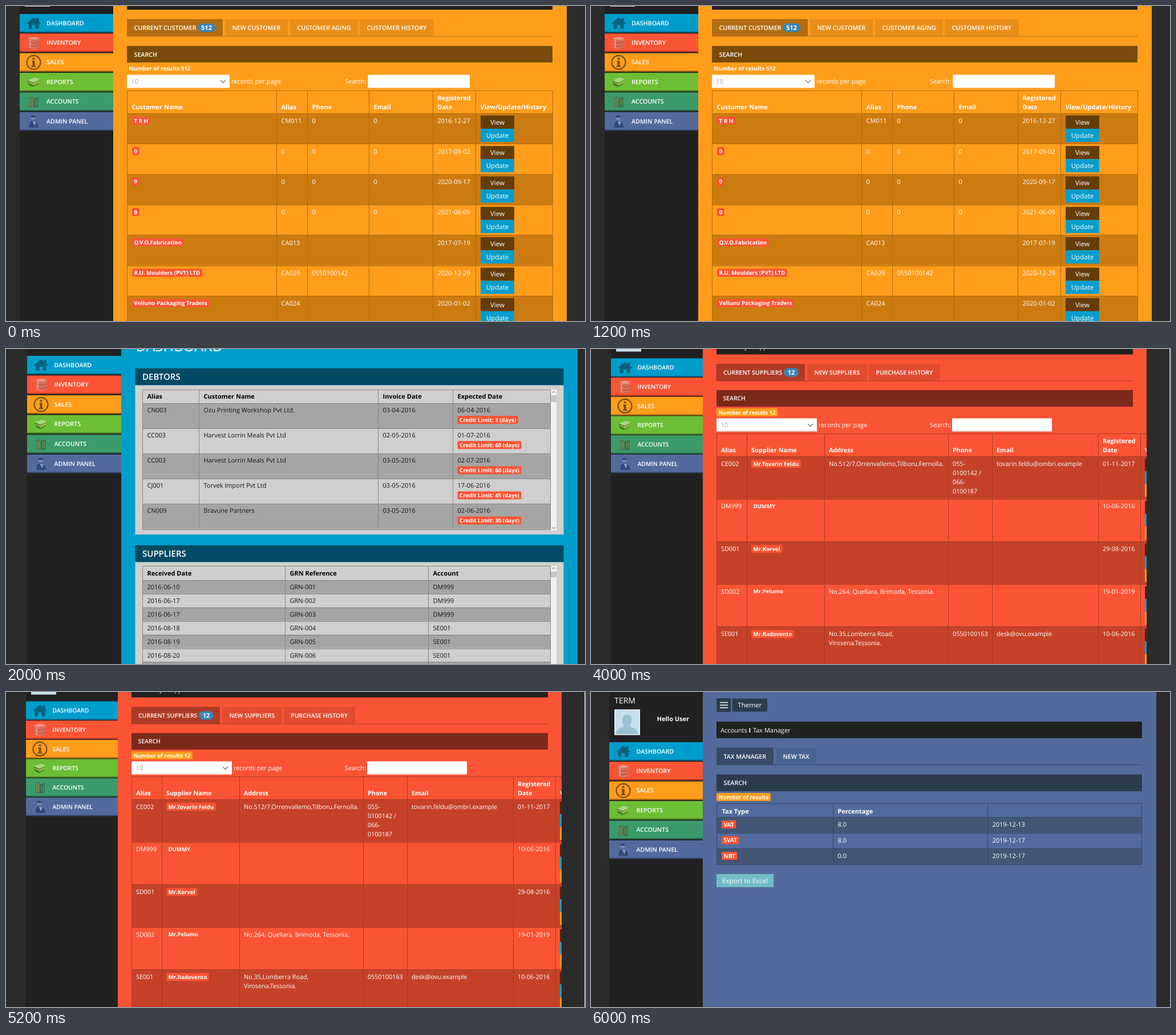
Animation of 1015x552 px, one loop 8 s. Source, as an HTML page:

```html
<!DOCTYPE html>
<html lang="en">
<head>
<meta charset="utf-8">
<title>Admin panel tour</title>
<style>
html, body { margin: 0; width: 100%; height: 100%; overflow: hidden; background: #2b2b2b; }
svg { display: block; width: 1015px; height: 552px; }
text { font-family: "Open Sans", "Noto Sans", sans-serif; white-space: pre; text-rendering: geometricPrecision; }
</style>
</head>
<body>
<svg id="stage" viewBox="0 0 1015 552"></svg>
<script>
const RED = '#fb5434', ORANGE = '#ff9d1b', BLUE = '#009dcb', NAVY = '#536b9c', BLACK = '#212121';
const SLIDE = 2000;
const pen = document.createElement('canvas').getContext('2d');

// Every helper returns SVG markup; boxes are given by two corners.
const box = (x, y, x2, y2, fill, r = 0) =>
  `<rect x="${x}" y="${y}" width="${x2 - x}" height="${y2 - y}" rx="${r}" fill="${fill}"/>`;
const path = (d, fill, stroke = 'none', w = 1) =>
  `<path d="${d}" fill="${fill}" stroke="${stroke}" stroke-width="${w}"/>`;
const text = (x, y, s, fill = '#fff', size = 11, weight = 400, anchor = 'start') =>
  `<text x="${x}" y="${y}" fill="${fill}" font-size="${size}" font-weight="${weight}" text-anchor="${anchor}">${s}</text>`;
const bold = (x, y, s, fill = '#fff', size = 11) => text(x, y, s, fill, size, 700);
const caps = (x, y, s, size = 10.7) => text(x, y, s, '#fff', size, 600);
const lines = (x, y, s, ...style) => s.split('\n').map((l, i) => text(x, y + i * 16, l, ...style)).join('');

function tag(x, y, s, fill = RED, size = 9.7) {
  pen.font = `700 ${size}px "Open Sans", "Noto Sans", sans-serif`;
  return box(x, y, x + pen.measureText(s).width + 7, y + 14, fill, 2) + bold(x + 3.5, y + 10.6, s, '#fff', size);
}

function button(x, y, x2, y2, s, fill) {
  return box(x, y, x2, y2, fill) + text((x + x2) / 2, (y + y2) / 2 + 4.3, s, '#fff', 11.6, 400, 'middle');
}

// Striped table: ys holds the header top followed by the row edges.
function grid(xs, ys, dark, line, light = 'none') {
  const left = xs[0], right = xs[xs.length - 1], end = ys[ys.length - 1];
  let s = '';
  for (let i = 0; i < ys.length - 1; i++) s += box(left, ys[i], right, ys[i + 1], i % 2 ? dark : light);
  for (const y of ys) s += box(left, Math.round(y), right + 1, Math.round(y) + 1, line);
  for (const x of xs) s += box(x, ys[0], x + 1, end, line);
  return s;
}

const edges = (top, first, pitch, n) => [top, ...Array.from({ length: n + 1 }, (_, i) => first + i * pitch)];

const ICONS = [
  path('M-13 1L0-10L5-6V-9H9V-3L13 1H9V10H3V3H-3V10H-9V1Z', '#04607d'),
  path('M-10-8V8Q0 14 10 8V-8Z', '#d9705c') + path('M-10-8Q0-13 10-8Q0-3-10-8Z', '#ef9c8a') +
    path('M-10-2Q0 3 10-2M-10 4Q0 9 10 4', 'none', '#b9533f', 1.2) + path('M-6-5V9', 'none', '#ee9a88', 2),
  '<circle r="12" fill="none" stroke="#764a12" stroke-width="2.2"/>' +
    path('M-2-8H2V-5H-2ZM-3-3H2V6H4V8H-4V6H-2V-1H-3Z', '#764a12'),
  path('M-11-3L2-8L11-4L-1 1Z', '#a9d77c') + path('M-11-3L-1 1V9L-9 5Z', '#3d7d2d') +
    path('M-1 1L11-4L8 5L-1 9Z', '#5b9a35') + path('M-9 0L-1 4L10-1', 'none', '#d5c65f', 1.5),
  path('M-8-7L-1-9V10H-8Z', '#56704a') + path('M0-5L8-8V10H0Z', '#2f6849') +
    path('M-6-5V8M-3-6V8M3-4V8M6-5V8', 'none', '#7d9856', 1.3),
  '<circle cx="-1" cy="-6" r="4.5" fill="#7185a9"/>' + path('M-6-7Q-1-14 4-7Z', '#263d67') +
    path('M-8 11Q-8-1-1-1Q8 0 9 11Z', '#304a78') + path('M-2 0L2 8L4 1Z', '#93a7c8')
];
const MENU = [
  ['DASHBOARD', BLUE, '#006b8b'], ['INVENTORY', RED, '#a93621'], ['SALES', ORANGE, '#ad6910'],
  ['REPORTS', '#6dbe35', '#478022'], ['ACCOUNTS', '#3b9b6b', '#266747'], ['ADMIN PANEL', NAVY, '#364871']
];

function frame(left, right, end, fill, top, pitch, textX, size) {
  let s = box(0, 0, 1015, 552, '#2b2b2b') + box(left, 0, right, 552, BLACK) + box(right, 0, end, 552, fill);
  MENU.forEach(([name, color, shade], i) => {
    const y = top + i * pitch;
    s += box(left, y, right, y + 32.5, shade) + box(left, y, right, y + 30.5, color) +
      `<g transform="translate(${left + 24.5} ${y + 16})">${ICONS[i]}</g>` + caps(textX, y + 19.6, name, size);
  });
  return s;
}

// Tabs are [left, right, label]; the first one is active.
function tabs(list, y, right, active, idle, size) {
  return list.map(([x, x2, s], i) => box(x, y, x2, y + 30, i ? idle : active) + caps(x + 12.5, y + 19, s, size)).join('') +
    box(list[0][0], y + 29.5, right, y + 30.5, active);
}

function counter(x, y, x2, s) {
  return box(x, y, x2, y + 15, '#3985b3', 7.5) + text((x + x2) / 2, y + 11.7, s, '#fff', 11, 700, 'middle');
}

function searchRow(x, y, selectEnd, inputX, inputEnd, size) {
  const c = selectEnd - 12;
  return box(x, y, selectEnd, y + 23, '#fff') + text(x + 7.5, y + 15.5, '10', '#a2a2a2') +
    path(`M${c - 4} ${y + 9.5}l4.5 4.5l4.5-4.5`, 'none', '#777', 1.3) +
    text(selectEnd + 3, y + 15, 'records per page', '#fff', size) + text(594, y + 15, 'Search:', '#fff', size) +
    box(inputX, y, inputEnd, y + 23, '#fff');
}

function customers() {
  const rows = [
    ['T R H', 'CM011', '0', '0', '2016-12-27'],
    ['0', '0', '0', '0', '2017-09-02'],
    ['0', '0', '0', '0', '2020-09-17'],
    ['0', '0', '0', '0', '2021-06-05'],
    ['Q.V.O.Fabrication', 'CA013', '', '', '2017-07-19'],
    ['R.U. Moulders (PVT) LTD', 'CA029', '0550100142', '', '2020-12-29'],
    ['Velluno Packaging Traders', 'CA024', '', '', '2020-01-02']
  ];
  const xs = [212, 474, 528, 636, 748, 823, 958], ys = edges(148, 188, 53.3, 7);
  let s = frame(24, 188, 983, ORANGE, 14, 34.4, 71) + box(33, 0, 77, 1, '#e4e4e4') +
    box(212, 0, 958, 6.5, BLACK) +
    tabs([[212, 380, 'CURRENT CUSTOMER'], [384, 494, 'NEW CUSTOMER'], [498, 617, 'CUSTOMER AGING'],
      [620, 750, 'CUSTOMER HISTORY']], 23, 958, '#b36d12', '#e98f19') +
    counter(336, 30.5, 367, '512') +
    box(212, 70, 958, 99, '#7a4a0a') + caps(224.5, 88.7, 'SEARCH') +
    bold(215.5, 113.3, 'Number of results 512', '#fff', 9.8) +
    searchRow(212, 120.5, 392, 634.5, 813) + grid(xs, ys, '#cc7b11', '#b06c0e');
  ['Customer Name', 'Alias', 'Phone', 'Email', 'Registered\nDate', 'View/Update/History'].forEach((h, i) => {
    s += lines(xs[i] + 8.5, i === 4 ? 165 : 181, h, '#fff', 11, 700);
  });
  rows.forEach((row, i) => {
    const y = ys[i + 1];
    s += tag(221, y + 6, row[0], RED, 9.8);
    for (let c = 1; c < 5; c++) s += text(xs[c] + 8.5, y + 17.3, row[c]);
    s += button(832, y + 4, 891, y + 27, 'View', '#643d09') + button(832, y + 27, 891, y + 50, 'Update', '#069dcc');
  });
  return s;
}

function panel(title, top, bottom) {
  return box(226.5, top, 977.5, top + 29.5, '#004b63') + caps(239, top + 20.3, title, 15) +
    box(226.5, top + 29.5, 977.5, bottom, '#d0d0d0');
}

function scrollbar(top, bottom, thumb) {
  const arrow = (y, d) => path(`M957.5 ${y}l2.5 ${-d}l2.5 ${d}`, 'none', '#777');
  return box(955, top, 965, bottom, '#f0f0f0') + box(955, top + 10, 965, top + 10 + thumb, '#c6c6c6') +
    arrow(top + 6, 3) + arrow(bottom - 6, -3);
}

function dashboard() {
  const debts = [
    ['CN003', 'Ozu Printing Workshop Pvt Ltd.', '03-04-2016', '06-04-2016', 3],
    ['CC003', 'Harvest Lorrin Meals Pvt Ltd', '02-05-2016', '01-07-2016', 60],
    ['CC003', 'Harvest Lorrin Meals Pvt Ltd', '03-05-2016', '02-07-2016', 60],
    ['CJ001', 'Torvek Import Pvt Ltd', '03-05-2016', '17-06-2016', 45],
    ['CN009', 'Bravune Partners', '03-05-2016', '02-06-2016', 30]
  ];
  const received = ['06-10', '06-17', '06-17', '08-18', '08-19', '08-20'];
  const ink = '#151515', line = '#858585', light = '#cfcfcf', dark = '#a5a5a5';
  const xs = [239, 338, 652, 783, 954], ys = edges(71, 95, 44.1, 5);
  const xs2 = [239, 489, 740, 954], ys2 = edges(380, 405, 23.9, 7);
  let s = frame(37, 202, 1002, BLUE, 12, 34.6, 84.5) + text(227.5, 4.2, 'DASHBOARD', '#fff', 25.4) +
    panel('DEBTORS', 34, 325) + grid(xs, ys, dark, line, light) + scrollbar(71, 318, 12);
  ['Alias', 'Customer Name', 'Invoice Date', 'Expected Date'].forEach((h, i) => {
    s += bold(xs[i] + 8.5, 87, h, '#000');
  });
  debts.forEach((row, i) => {
    const y = ys[i + 1];
    for (let c = 0; c < 4; c++) s += text(xs[c] + 8.5, y + 16, row[c], ink);
    s += tag(791.5, y + 22.2, `Credit Limit: ${row[4]} (days)`);
  });
  s += panel('SUPPLIERS', 344, 552) + grid(xs2, ys2, dark, line, light) + scrollbar(380, 570, 10);
  ['Received Date', 'GRN Reference', 'Account'].forEach((h, i) => {
    s += bold(xs2[i] + 8.5, 397, h, '#000');
  });
  received.forEach((date, i) => {
    const row = ['2016-' + date, 'GRN-00' + (i + 1), i < 3 ? 'DM999' : 'SE001'];
    row.forEach((v, c) => s += text(xs2[c] + 8.5, ys2[i + 1] + 16, v, ink));
  });
  return s;
}

function suppliers() {
  const rows = [
    ['CE002', 'Mr.Tovarin Feldu', 'No.512/7,Orrenvallemo,Tilboru,Fernolla.', '055-\n0100142 /\n066-\n0100187',
      'tovarin.feldu@ombri.example', '01-11-2017'],
    ['DM999', 'DUMMY', '', '', '', '10-06-2016'],
    ['SD001', 'Mr.Korvel', '', '', '', '29-08-2016'],
    ['SD002', 'Mr.Pelumo', 'No.264, Quellara, Brimoda, Tessonia.', '', '', '19-01-2019'],
    ['SE001', 'Mr.Radovento', 'No.35,Lomberra Road,\nVirosena.Tessonia.', '0550100163', 'desk@ovu.example', '10-06-2016']
  ];
  const xs = [220, 273, 409, 626, 703, 889, 963, 974], ys = edges(148, 188, 74.6, 5);
  const size = 10.8, small = 10.4;
  let s = frame(35, 196, 974, RED, 16.5, 33.7, 81.5, small) + box(44, 0, 88, 4.5, '#c9e2ec') +
    box(220, 0, 950, 9.5, BLACK) + text(226.5, -.3, 'Inventory I Suppliers', '#fff', size) +
    tabs([[219.5, 375, 'CURRENT SUPPLIERS'], [379, 484, 'NEW SUPPLIERS'], [487, 612, 'PURCHASE HISTORY']],
      26, 950, '#ad3b25', '#e14c2f', small) +
    counter(338, 33.5, 364, '12') +
    box(220, 72, 950, 101, '#7b2a1a') + caps(231.5, 90.3, 'SEARCH', small) +
    tag(220, 104, 'Number of results 12', ORANGE, 9.55) +
    searchRow(220, 121.5, 396, 633, 808, size) + grid(xs, ys, '#c54229', '#a83a24');
  ['Alias', 'Supplier Name', 'Address', 'Phone', 'Email', 'Registered\nDate'].forEach((h, i) => {
    s += lines(xs[i] + 8, i === 5 ? 165 : 181, h, '#fff', size, 700);
  });
  s += bold(971, 181, 'V', '#fff', size);
  rows.forEach((row, i) => {
    const y = ys[i + 1];
    row.forEach((v, c) => s += c === 1 ? tag(281, y + 6, v, RED, 9.6) : lines(xs[c] + 8, y + 16.7, v, '#fff', size));
    s += box(971, y + 4, 974, y + 26, '#5d2015') + box(971, y + 26, 974, y + 48, '#189bc4') +
      box(971, y + 48.5, 974, y + 71, ORANGE);
  });
  return s + box(974, 0, 1014, 552, '#2b2b2b') + box(1014, 0, 1015, 552, '#e2e2e2');
}

function taxes() {
  const rows = [['VAT', '8.0', '2019-12-13'], ['SVAT', '8.0', '2019-12-17'], ['NBT', '0.0', '2019-12-17']];
  const xs = [220, 424, 695, 965], ys = edges(195, 219, 27.5, 3), slate = '#2c3b4c';
  let s = frame(32, 196, 991, NAVY, 88, 34.4, 79.5) + text(41, 20, 'TERM', '#fff', 14) + bold(115.5, 51, 'Hello User') +
    box(41, 30.5, 86, 75.5, '#e8f5fa') + box(42.5, 32, 84.5, 74, '#c3e0eb') +
    path('M44 74Q44 64 57 61V57Q53 50 56 43Q63 36 70 43Q73 50 69 57V61Q82 64 83 74Z', '#9bc2d1') +
    box(220, 11, 245, 35, slate) + path('M226 18.5H240M226 23H240M226 27.5H240', 'none', '#fff', 1.6) +
    button(247.5, 11.5, 309, 34.5, 'Themer', slate) +
    box(220, 52, 966, 81, BLACK) + text(227, 70.7, 'Accounts') + bold(276.5, 70.7, 'I') + text(284, 70.7, 'Tax Manager') +
    tabs([[220, 320, 'TAX MANAGER'], [324, 395, 'NEW TAX']], 97.5, 966, '#374967', '#496390') +
    box(220, 144.5, 966, 174, slate) + caps(232.5, 163.3, 'SEARCH') +
    tag(220, 177, 'Number of results', ORANGE) + grid(xs, ys, '#435675', '#35476a');
  s += bold(229.5, 212.5, 'Tax Type') + bold(432.5, 212.5, 'Percentage');
  rows.forEach((row, i) => {
    const y = ys[i + 1];
    s += tag(229, y + 6, row[0], RED, 10) + text(432.5, y + 17, row[1]) + text(703.5, y + 17, row[2]);
  });
  return s + button(220, 319, 320, 342, 'Export to Excel', '#73bbc6');
}

const stage = document.getElementById('stage');
stage.innerHTML = [customers, dashboard, suppliers, taxes].map(view => `<g>${view()}</g>`).join('');
const views = [...stage.children];
const start = performance.now();

function show(now) {
  const current = Math.floor(Math.max(0, now - start) / SLIDE) % views.length;
  views.forEach((v, i) => v.style.display = i === current ? '' : 'none');
  requestAnimationFrame(show);
}
show(start);
</script>
</body>
</html>
```
